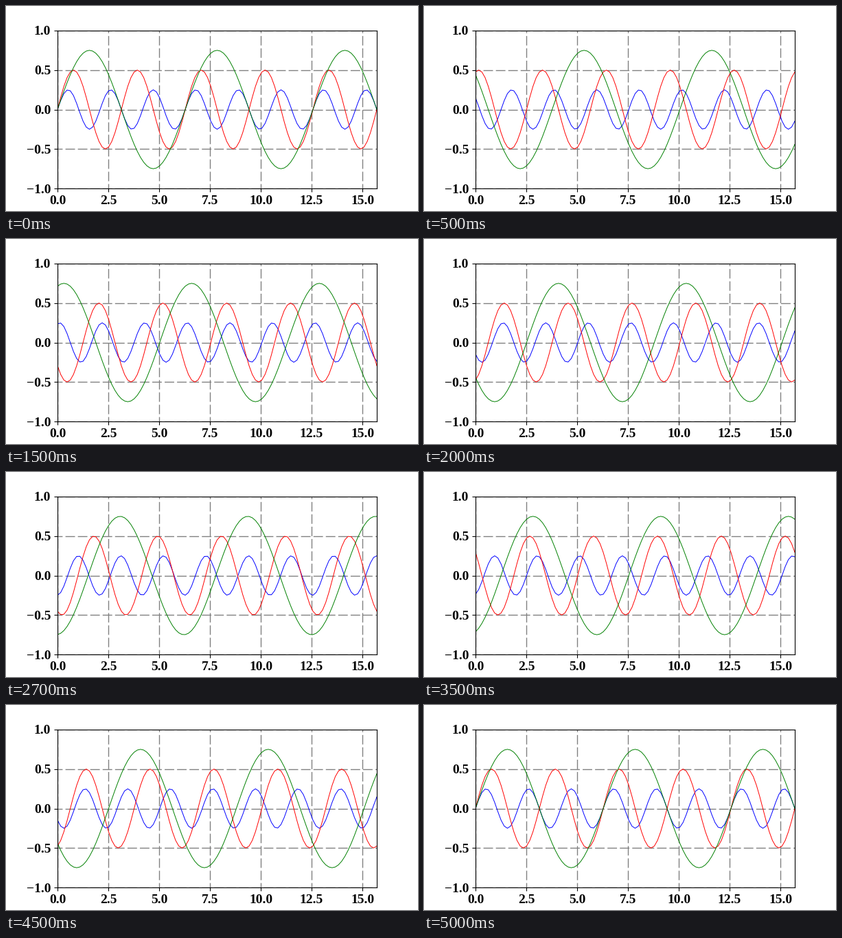
These frames come from a looping animation (600 by 300 pixels, 5100 ms). A matplotlib script:

```python
import matplotlib.pyplot as plt
import numpy as np
from matplotlib.animation import FuncAnimation

FRAMES = 51
INTERVAL = 100  # ms

plt.rcParams.update({
    "font.family": "Liberation Serif",
    "font.weight": "bold",
    "font.size": 14,
})

# (amplitude, wave number, turns per loop, colour)
WAVES = [
    (0.25, 3, 6, "b"),
    (0.50, 2, 8, "r"),
    (0.75, 1, 6, "g"),
]

x = np.linspace(0, 5 * np.pi, 101)
times = np.linspace(0, 2 * np.pi, FRAMES)

fig, ax = plt.subplots(figsize=(6, 3), dpi=100)
fig.subplots_adjust(left=0.125, right=0.9, bottom=0.11, top=0.88)
ax.set_xlim(0, 5 * np.pi)
ax.set_ylim(-1, 1)
ax.set_xticks(np.arange(0, 15.1, 2.5))
ax.set_yticks(np.arange(-1, 1.1, 0.5))
ax.grid(color="gray", linewidth=1, linestyle=(5, (10, 3)))

lines = [ax.plot([], [], color=color, linewidth=0.7)[0]
         for *_, color in WAVES]


def draw(frame):
    t = times[frame]
    for line, (amp, k, speed, _) in zip(lines, WAVES):
        line.set_data(x, amp * np.sin(k * x - speed * t))
    return lines


anim = FuncAnimation(fig, draw, frames=FRAMES, interval=INTERVAL,
                     repeat=True, repeat_delay=0)
plt.show()
```
